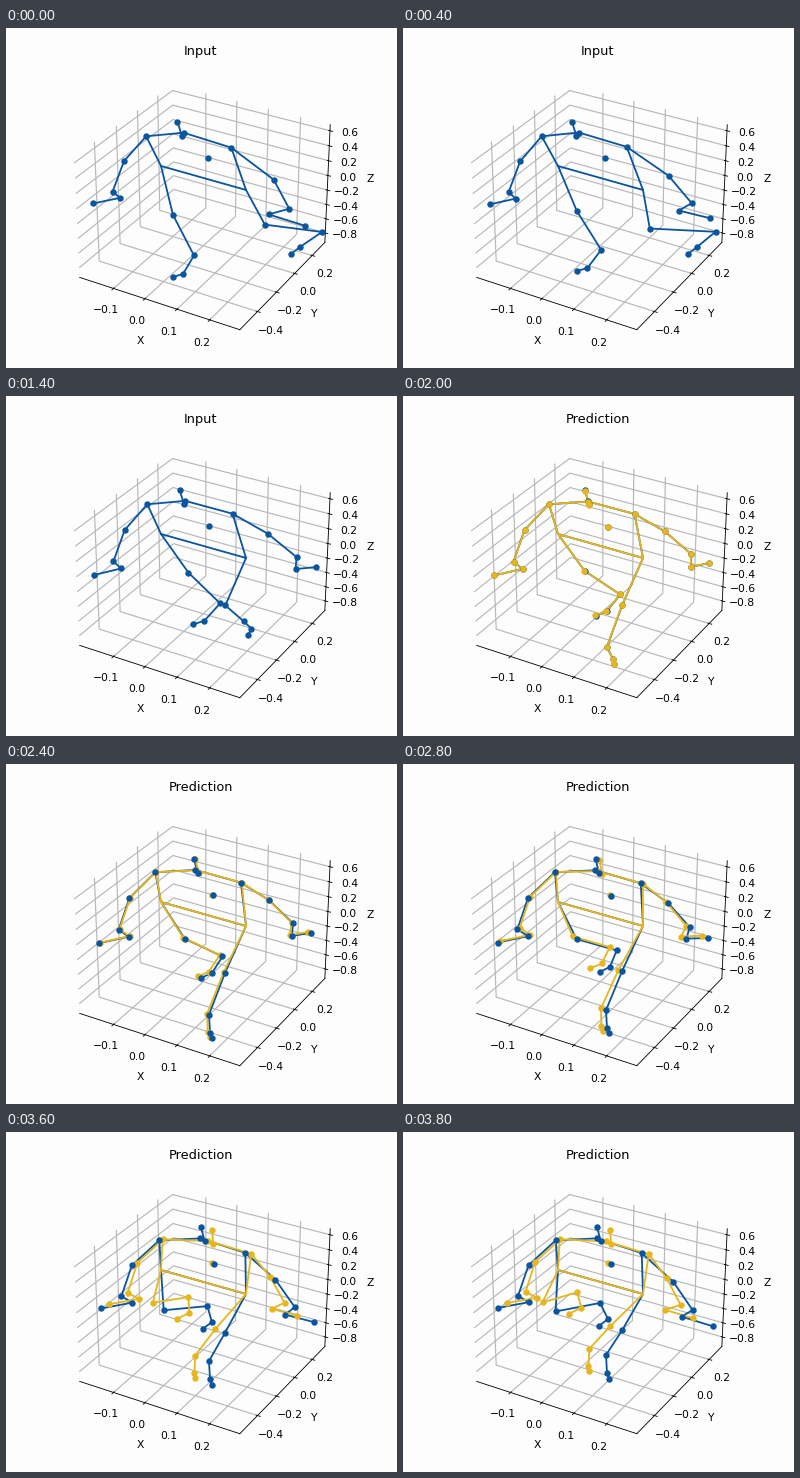
Write a matplotlib script that moves like this. It is 391x340 px and loops after 4000 ms.

```python
import matplotlib.pyplot as plt
import numpy as np
from matplotlib.animation import FuncAnimation

W, H, DPI = 391, 340, 77
FRAMES, STEP = 20, 200
FORECAST = 10                 # first predicted step
STRIDE = 28                   # steps in one full sway of the body
BLUE, GOLD, PAPER = "#0b559f", "#e6b61c", "#fdfdfd"

# Joint order: head 0-3, arms 4-8 and 9-13, legs 14-17 and 18-21, hips 22-23.
CHAINS = [
    [0, 1, 2], [4, 2, 9], [22, 23],
    [4, 5, 6, 7, 8], [9, 10, 11, 12, 13],
    [4, 22, 14, 15, 16, 17], [9, 23, 18, 19, 20, 21],
]
HIPS = np.array([[155, 138], [240, 162]])


def xy(x, y):
    """Stack x and y, either of which may be a single number."""
    return np.stack(np.broadcast_arrays(x, y), axis=-1).astype(float)


def smooth(s):
    s = np.clip(s, 0, 1)
    return s * s * (3 - 2 * s)


def head(sway, lift):
    """Crown, jaw, neck, chest."""
    rest = xy([182, 186, 185, 205], [94.5, 108.5, 105.5, 131])
    return rest + sway * xy([13.5, 13, 9.5, 3.5], 1)


def left_arm(sway, lift):
    """Shoulder, elbow, wrist, thumb, hand."""
    rest = xy([146, 121.5, 110.5, 119.5, 91], [108.3, 133.5, 164.5, 171, 177])
    return rest + sway * xy([7.5, 4.5, 5, 7, 4.5], 0) \
                + lift * xy(0, np.linspace(0, 2.5, 5))


def right_arm(sway, lift, t):
    """Same joints as the left arm; the forearm unfolds at the start."""
    rest = xy([231.5, 266.5, 291, 284, 311], [119.5, 145.5, 172, 180.5, 186])
    fold = 1 - smooth(t / 4)
    return rest + sway * xy([8, 2, -3, -4, -4], [1, 0, 0, 0, 0]) \
                + lift * xy([0, -4.5, -3, 4, -5], [-1.5, -10, -14, -9.5, -19]) \
                + fold * xy([0, 0, -12, -22, -18], 0)


def left_leg(t):
    """Knee, ankle, heel, toe on parabolas through three poses."""
    start = xy([167, 188, 177, 167], [187, 227.5, 246, 249])
    middle = xy([182, 217, 203, 192], [175, 200, 217, 221])
    end = xy([152.5, 197, 205, 196], [179.5, 171, 187, 194])
    u = 2 * t / (FRAMES - 1) - 1
    return start * u * (u - 1) / 2 + middle * (1 - u * u) + end * u * (u + 1) / 2


def right_leg(t):
    """Swings forward knee first, plants the foot, then lifts it."""
    raised = xy([264, 316, 294, 285], [195, 204, 219, 226])
    planted = xy([219, 203, 204, 206], [209.5, 252, 270, 275])
    s = smooth((t - np.array([-2, 1, 2, 2])) / 9.5)
    arc = 4 * s * (1 - s) * np.array([0, 14, 14, 14])
    rise = (max(t - 10, 0) / 9) ** 2 * np.array([11, 29, 29, 28])
    return raised + (planted - raised) * s[:, None] - xy(0, arc + rise)


def pose(t):
    a = 2 * np.pi * (t - 10) / STRIDE
    sway, lift = np.sin(a), np.cos(a)
    return np.vstack([head(sway, lift), left_arm(sway, lift),
                      right_arm(sway, lift, t), left_leg(t), right_leg(t), HIPS])


def spread(root, tip, n):
    """Error along a limb, growing from its root to its tip."""
    root, tip = np.array(root), np.array(tip)
    return root + (tip - root) * np.sqrt(np.linspace(0, 1, n))[:, None]


DRIFT = np.vstack([
    spread((13, 3), (9, 3), 3), [[-3, -1]],
    spread((4, -1), (9, -5), 5), spread((7, 1), (-20, -8), 5),
    spread((-13, -9), (-30, -12), 4), spread((-12, -4), (-20, -8), 4),
    np.zeros((2, 2)),
])


def predicted(t):
    return pose(t) + DRIFT * ((t - FORECAST + 0.5) / 9.5) ** 1.6


def bones(joints):
    gap = [[np.nan, np.nan]]
    return np.vstack([part for c in CHAINS for part in (joints[c], gap)])


plt.rcParams.update({"grid.color": "#b8b8b8", "grid.linewidth": 1.1})
fig = plt.figure(figsize=(5.078, 4.416), dpi=DPI, facecolor=PAPER)

# Plot box
left, top, size = 52.2, 34.7, 285
ax = fig.add_axes([left / W, 1 - (top + size) / H, size / W, size / H],
                  projection="3d", facecolor=PAPER)
ax.set_xticks([-0.1, 0, 0.1, 0.2])
ax.set_yticks([-0.4, -0.2, 0, 0.2])
ax.set_zticks(np.arange(-4, 4) / 5)
ax.set(xlim=(-0.21, 0.29), ylim=(-0.58, 0.35), zlim=(-0.935, 0.679),
       xlabel="X", ylabel="Y", zlabel="Z")
for axis in (ax.xaxis, ax.yaxis, ax.zaxis):
    axis.set_pane_color(PAPER)
title = ax.set_title("Input", pad=7)

# Skeletons, in screen pixels
stage = fig.add_axes([0, 0, 1, 1], xlim=(0, W), ylim=(H, 0))
stage.axis("off")


def skeleton(color, z):
    line, = stage.plot([], [], color=color, lw=1.7, zorder=z,
                       solid_joinstyle="round")
    dots, = stage.plot([], [], "o", color=color, ms=6, mew=0, zorder=z + 2)
    return line, dots


def place(body, joints):
    line, dots = body
    line.set_data(*bones(joints).T)
    dots.set_data(*joints[:-2].T)


truth = skeleton(BLUE, 2)
guess = skeleton(GOLD, 3)


def update(i):
    forecast = i >= FORECAST
    title.set_text("Prediction" if forecast else "Input")
    place(truth, pose(i))
    if forecast:
        place(guess, predicted(i))
    for artist in guess:
        artist.set_visible(forecast)
    truth[1].set_zorder(6 if i >= 12 else 4)
    return (title, *truth, *guess)


anim = FuncAnimation(fig, update, frames=FRAMES, interval=STEP,
                     repeat=True, repeat_delay=0, blit=False)
plt.show()
```
